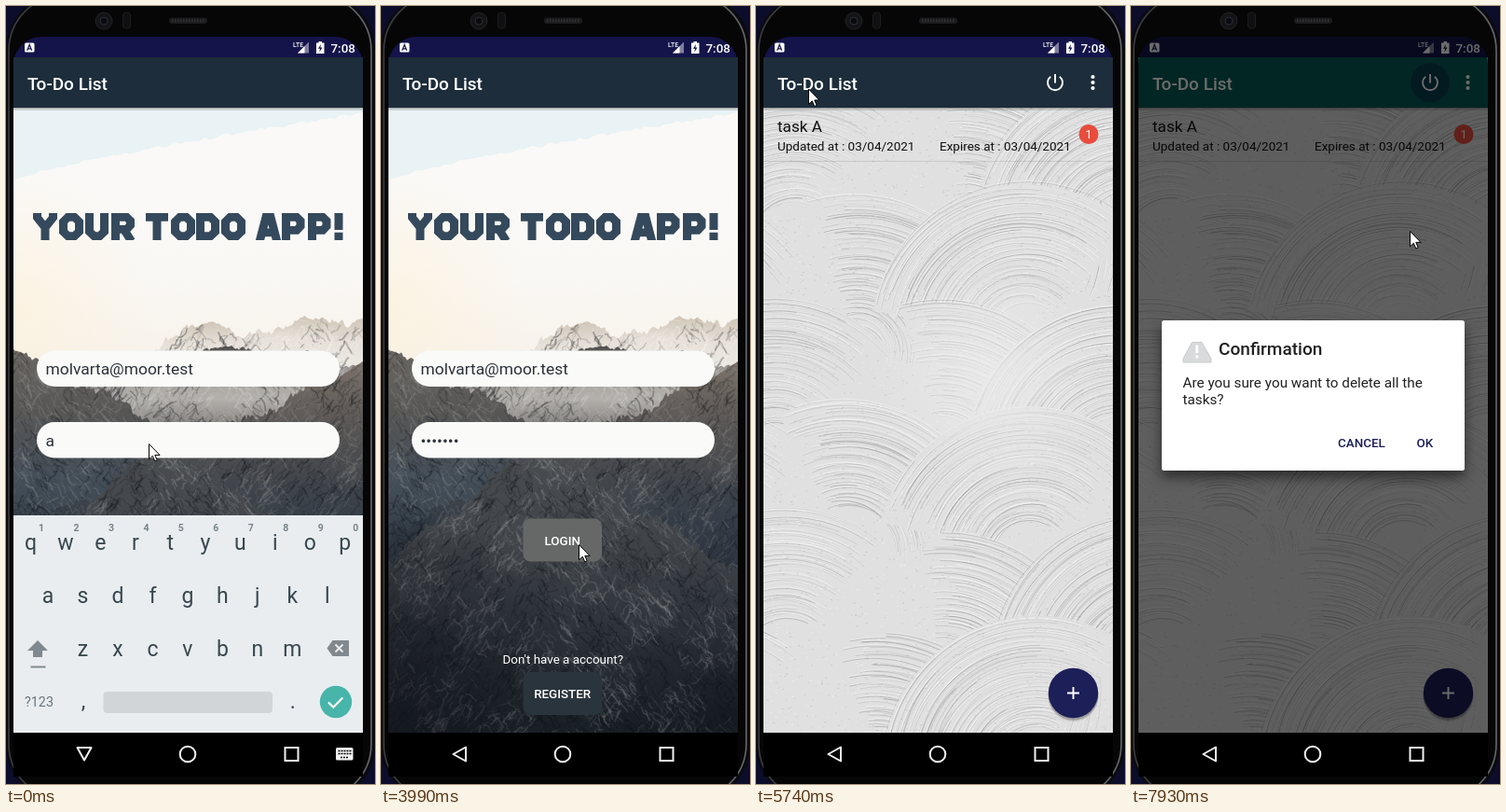
An HTML page with a canvas for the animation above (8000 ms loop, 396 px wide and 834 px high).

```html
<!DOCTYPE html>
<html lang="en">
<head>
<meta charset="utf-8">
<title>To-Do List</title>
<style>
html, body { margin: 0; width: 100%; height: 100%; overflow: hidden; background: #0b0d2a; }
#stage { position: relative; width: 396px; height: 834px; overflow: hidden; }
#stage svg, #stage div { position: absolute; left: 0; top: 0; width: 396px; height: 834px; }
canvas { position: absolute; left: 8px; top: 109px; }
text { font-family: Roboto, "Noto Sans", sans-serif; white-space: pre; }
.mid { text-anchor: middle; }
.bold { font-weight: 500; }
#keyboard { clip-path: inset(0 0 54px 0); }
</style>
</head>
<body>
<div id="stage">

<svg viewBox="0 0 396 834">
  <defs>
    <linearGradient id="rim"><stop stop-color="#3c3d41"/><stop offset=".5" stop-color="#1c1d20"/><stop offset="1" stop-color="#66686d"/></linearGradient>
  </defs>
  <rect width="396" height="834" fill="#0b0d2a"/>
  <rect x="0" y="-14" width="396" height="867" rx="61" fill="#0b0b0e"/>
  <rect x="3" y="-12" width="389" height="863" rx="60" fill="#060607" stroke="url(#rim)" stroke-width="1.6"/>
  <circle cx="105" cy="16" r="9" fill="#141416" stroke="#232326"/>
  <circle cx="105" cy="16" r="4" fill="#0a0b12" stroke="#2b2d36"/>
  <rect x="125.5" y="7" width="8" height="17" rx="3" fill="#101012" stroke="#1d1d20"/>
  <rect x="175" y="12.5" width="41" height="6.5" rx="3" fill="#1b1b1d"/>
  <path d="M178 15.7h35" stroke="#313134" stroke-width="3" stroke-dasharray="1.5 1.5"/>
  <path d="M8 63A30 30 0 0 1 38 33H353A30 30 0 0 1 383 63Z" fill="#14144a"/>
  <rect x="8" y="55" width="375" height="724" fill="#1d2d3b"/>
  <rect x="8" y="779" width="375" height="47"/>
</svg>

<div id="home">
  <canvas id="peaks" width="375" height="670"></canvas>
  <svg viewBox="0 0 396 834">
    <clipPath id="caps"><rect x="20" y="222" width="350" height="29"/></clipPath>
    <g clip-path="url(#caps)">
      <g id="heading" role="img" aria-label="YOUR TODO APP!" fill="none" stroke="#35495c" stroke-width="9"/></g>
    </g>
    <g fill="#fafaf9">
      <rect x="33" y="369.5" width="325" height="38.5" rx="19.2"/>
      <rect x="33" y="446" width="325" height="38.5" rx="19.2"/>
    </g>
    <g fill="#2c3038" font-size="17.4">
      <text x="42.5" y="395">molvarta@moor.test</text>
      <text id="secret" x="42.5" y="471.5">a</text>
    </g>
    <rect id="caret" y="453" width="2" height="23" fill="#1c2058"/>
    <rect id="login" x="152.5" y="549.5" width="84.5" height="46" rx="8"/>
    <rect x="152.5" y="714" width="84.5" height="46" rx="8" fill="#2a343c"/>
    <g class="mid" fill="#fff" font-size="13.4">
      <text class="bold" x="194.7" y="578">LOGIN</text>
      <text x="195.3" y="704.5">Don't have a account?</text>
      <text class="bold" x="194.7" y="742">REGISTER</text>
    </g>
  </svg>
</div>

<div id="list">
  <canvas id="plaster" width="375" height="670"></canvas>
  <svg viewBox="0 0 396 834">
    <g fill="#111">
      <text x="23" y="135" font-size="17.2">task A</text>
      <text x="23" y="154.5" font-size="13.5">Updated at : 03/04/2021</text>
      <text x="197" y="154.5" font-size="13.5">Expires at : 03/04/2021</text>
    </g>
    <path d="M8 166.5H383" stroke="#000" opacity=".1"/>
    <circle cx="357" cy="137.5" r="10.5" fill="#e84c3d"/>
    <text class="mid" x="357" y="142.3" font-size="13.4" fill="#fff">1</text>
    <circle cx="340.5" cy="740" r="27" opacity=".12"/>
    <circle cx="340.5" cy="738.5" r="27" opacity=".2"/>
    <circle cx="340.5" cy="736.5" r="26.7" fill="#1c1f58"/>
    <path d="M334 736.5h13M340.5 730v13" stroke="#fff" stroke-width="1.9"/>
  </svg>
</div>

<svg viewBox="0 0 396 834">
  <rect id="bar" x="8" y="55" width="375" height="54"/>
  <path d="M8 109.5H383" stroke="#000" opacity=".3"/>
  <path d="M8 111H383" stroke="#000" stroke-width="2" opacity=".12"/>
  <text class="bold" x="23" y="89.8" font-size="19" fill="#fff">To-Do List</text>
  <g id="tools">
    <circle id="tap" cx="321" cy="82" r="21" fill="#0a2a4a" opacity=".55"/>
    <path d="M316.2 75.8a8 8 0 1 0 9.6 0M321 73v9.5" fill="none" stroke="#fff" stroke-width="1.9"/>
    <path d="M361.5 76v13" stroke="#fff" stroke-width="4.2" stroke-linecap="round" stroke-dasharray="0 6"/>
  </g>
  <rect x="20" y="39.5" width="10.5" height="10" rx="1.5" fill="#fff"/>
  <path d="M22.7 47.8L25.2 41.5L27.7 47.8M23.5 45.8h3.5" fill="none" stroke="#14144a" stroke-width="1.2"/>
  <text class="bold" x="308" y="43.5" font-size="6.8" fill="#fff">LTE</text>
  <path d="M325 38.5V50.5H313Z" fill="#7f80a0"/>
  <path d="M320.5 43V50.5H313Z" fill="#fff"/>
  <path d="M333 39.5h2.5v-1.5h3.5v1.5h2.5v11.5h-8.5z" fill="#fff"/>
  <path d="M338 40.8l-3 4.9h2l-.7 3.8l3.2-5h-2.2z" fill="#14144a"/>
  <clipPath id="corner"><path d="M8 83V63A30 30 0 0 1 38 33H353A30 30 0 0 1 383 63V83Z"/></clipPath>
  <text class="bold" clip-path="url(#corner)" x="348.5" y="49.5" font-size="13.4" fill="#fff">7:08</text>
</svg>

<svg id="keyboard" viewBox="0 0 396 834">
  <g id="keys">
    <rect x="8" y="546" width="375" height="233" fill="#e9edf0"/>
    <g id="letters" class="mid" fill="#37474f"></g>
    <path d="M34 680l11 11h-6v7h-10v-7h-6z" fill="#80898f"/>
    <path d="M26.5 708.5h16" stroke="#80898f" stroke-width="2"/>
    <path d="M344.5 688.5l6-8.5h17.5v17h-17.5z" fill="#80898f"/>
    <path d="M353.5 684.5l8 8m0-8l-8 8" stroke="#e9edf0" stroke-width="1.9"/>
    <rect x="104.5" y="735" width="181.5" height="23" rx="4" fill="#d2d5d7"/>
    <circle cx="354" cy="746" r="17.2" fill="#48b5aa"/>
    <path d="M346 746.5l5.3 5.3l10-10.3" fill="none" stroke="#fff" stroke-width="2.2"/>
  </g>
</svg>

<svg viewBox="0 0 396 834">
  <rect id="press" x="39" y="780" width="90" height="45" rx="22.5" fill="#303233"/>
  <g fill="none" stroke="#f2f2f2" stroke-width="2">
    <path id="back" d="M77.5 802L91 794.5V809.5Z" stroke-linejoin="round"/>
    <circle cx="195" cy="802" r="8.3"/>
    <rect x="299.5" y="795" width="14" height="14"/>
  </g>
  <g id="switcher">
    <rect x="354" y="795" width="18.5" height="13.5" rx="1.5" fill="#f2f2f2"/>
    <path d="M356.5 798.5h14M356.5 801.5h14M359 805.5h9" stroke="#000" stroke-width="1.4" stroke-dasharray="2 1"/>
  </g>
</svg>

<svg id="dialog" viewBox="0 0 396 834">
  <path d="M8 779V63A30 30 0 0 1 38 33H353A30 30 0 0 1 383 63V779Z" opacity=".58"/>
  <rect x="33" y="337" width="325" height="161" rx="2.5" fill="#fff" style="filter: drop-shadow(0 7px 7px #0008)"/>
  <path d="M65.5 360.5h10.5l10 17.5v4h-30v-4z" fill="#d9dadb" stroke="#c9cacb" stroke-linejoin="round"/>
  <path d="M70.8 363.5v8.5M70.8 374.5v3" stroke="#fff" stroke-width="2.8"/>
  <g fill="#212121">
    <text class="bold" x="94" y="374.3" font-size="19.1">Confirmation</text>
    <text x="55.5" y="409" font-size="15.3">Are you sure you want to delete all the</text>
    <text x="55.5" y="427" font-size="15.3">tasks?</text>
  </g>
  <g class="bold" fill="#1c2058" font-size="13.4">
    <text x="222" y="473">CANCEL</text>
    <text x="306.5" y="473">OK</text>
  </g>
</svg>

<svg viewBox="0 0 396 834">
  <path id="pointer" d="M0 0V16.3L3.8 12.8L6.3 18.5L8.7 17.5L6.3 11.9H11.5Z" fill="#fff" stroke="#000"/>
</svg>
</div>

<script>
const $ = id => document.getElementById(id);
const LOOP = 8000, TICK = 137;

function svgAdd(parent, tag, attrs, label) {
  const el = document.createElementNS("http://www.w3.org/2000/svg", tag);
  for (const k in attrs) el.setAttribute(k, attrs[k]);
  if (label) el.textContent = label;
  parent.append(el);
}

function seeded(s) {
  return () => {
    s = (s + 0x6D2B79F5) | 0;
    let x = Math.imul(s ^ (s >>> 15), 1 | s);
    x = (x + Math.imul(x ^ (x >>> 7), 61 | x)) ^ x;
    return ((x ^ (x >>> 14)) >>> 0) / 4294967296;
  };
}

// Block lettering for the heading, drawn on a 30px cap height.
const glyphs = {
  Y: "M4.5-2v7L13 16L21.5 5V-2M13 14v16",
  O: "M9.5 4.5h7l5 5v11l-5 5h-7l-5-5v-11z",
  U: "M4.5 0v20.5l5 5h6l5-5V0",
  R: "M4.5 30V4.5h12l4 4v5l-4 4.5H4.5M13.5 18l8 13",
  T: "M0 4.5h24M12 4v26",
  D: "M4.5 4.5h11l5 5v11l-5 5h-11z",
  A: "M4 32L11 4.5h5L23 32M7 21.5h13",
  P: "M4.5 30V4.5h11.5l4 4v6l-4 4.5H4.5",
  "!": "M5 0v18.5M5 21.5v8.5"
};
function word(letters, x, step) {
  [...letters].forEach((c, i) => svgAdd($("heading"), "path",
    { d: glyphs[c], transform: `translate(${x + i * step} 222) scale(1 .967)` }));
}
word("YOUR", 29, 28);
word("TODO", 150, 27);
word("APP!", 268, 28);

function keyRow(chars, x, y, style = { "font-size": 23 }) {
  [...chars].forEach((c, i) => svgAdd($("letters"), "text", { x: x + i * 37.47, y, ...style }, c));
}
keyRow("1234567890", 38, 562.5, { "font-size": 10.5, "font-weight": 700, fill: "#78848b" });
keyRow("qwertyuiop", 26.5, 583);
keyRow("asdfghjkl", 45, 640);
keyRow("zxcvbnm", 82.5, 697);
keyRow(",     .", 83, 753);
svgAdd($("letters"), "text", { x: 35.5, y: 751, "font-size": 14.3, fill: "#68757d" }, "?123");

function paintPeaks() {
  const c = $("peaks").getContext("2d"), rnd = seeded(11);
  const fade = (y0, y1, stops) => {
    const g = c.createLinearGradient(0, y0, 0, y1);
    stops.forEach((s, i) => g.addColorStop(i / (stops.length - 1), s));
    return g;
  };
  function glow(x, y, r, rgb, alpha) {
    const g = c.createRadialGradient(x, y, 0, x, y, r);
    g.addColorStop(0, `rgba(${rgb},${alpha})`);
    g.addColorStop(1, `rgba(${rgb},0)`);
    c.fillStyle = g;
    c.fillRect(8, 109, 375, 670);
  }
  // One summit with straight flanks, roughened by octaves, and scree running downhill.
  function mountain(x, y, left, right, depth, stops, bright) {
    const phase = rnd() * 9;
    const top = px => {
      const d = Math.abs(px - x);
      let v = y + d * (px < x ? left : right);
      for (let k = 1; k < 6; k++) v += Math.min(1, d / 30) * 5 / k * Math.sin(px * .07 * k * k + phase * k);
      return v;
    };
    c.save();
    c.beginPath();
    c.moveTo(8, 780);
    for (let px = 8; px <= 384; px += 2) c.lineTo(px, top(px) + rnd() * 1.5);
    c.lineTo(384, 780);
    c.fillStyle = fade(y, y + depth, stops);
    c.fill();
    c.clip();
    for (let i = 0; i < depth * 12; i++) {
      let px = 8 + rnd() * 375, py = top(px) + rnd() * depth;
      const face = Math.sin(px * .075 + py * .035 + phase) + Math.sin(px * .03 - py * .06) + rnd() * 2 - 1;
      const lean = (px < x ? -1 : 1) * (rnd() < .75 ? 1 : -1);
      c.strokeStyle = face > 0 ? `rgba(${bright},${.06 + rnd() * .2})` : `rgba(10,14,20,${.08 + rnd() * .22})`;
      c.lineWidth = .5 + rnd() * 1.6;
      c.beginPath();
      c.moveTo(px, py);
      for (let k = 0; k < 4; k++) c.lineTo(px += lean * rnd() * 4, py += rnd() * 5);
      c.stroke();
    }
    c.restore();
  }
  c.translate(-8, -109);
  c.fillStyle = fade(109, 380, ["#faf9f8", "#faf9f7", "#faf8f5", "#f7f2ea"]);
  c.fillRect(8, 109, 375, 670);
  c.beginPath();
  c.moveTo(8, 109);
  for (let x = 8; x <= 383; x += 5) c.lineTo(x, 185 - 72 * ((x - 8) / 375) ** .8 + rnd() * 4);
  c.lineTo(383, 109);
  c.fillStyle = "#e9f2f4";
  c.fill();
  glow(8, 320, 150, "253,240,214", .6);

  const haze = ["#cfc4b6", "#e6e0d8", "#ebe7e1"];
  mountain(222, 337, .42, .4, 50, haze, "250,246,240");
  mountain(320, 332, .42, .3, 50, haze, "250,246,240");
  mountain(383, 334, .5, 0, 50, haze, "250,246,240");
  mountain(228, 365, .22, .12, 85, ["#4f4e4e", "#a5a29e", "#b3b0ac", "#85827f"], "225,222,218");
  mountain(8, 368, 0, .5, 200, ["#6b6763", "#575655", "#46505a", "#35404a"], "165,165,163");
  mountain(383, 380, .5, 0, 260, ["#7d736a", "#504f50", "#343d47", "#252e37"], "150,148,145");
  mountain(165, 470, .8, .62, 300, ["#4b4d50", "#41454a", "#2d3339", "#1b2128"], "170,171,172");
  glow(20, 740, 200, "16,20,26", .65);
  glow(370, 780, 150, "16,20,26", .5);
}

function paintPlaster() {
  const c = $("plaster").getContext("2d"), rnd = seeded(5);
  c.translate(-8, -109);
  c.fillStyle = "#e0e0e0";
  c.fillRect(8, 109, 375, 670);
  // Trowel sweeps, laid like overlapping scales with alternating tilt.
  function sweep(x, y, tilt) {
    const mid = tilt - Math.PI / 2, inner = 25 + rnd() * 30, outer = 165;
    c.beginPath();
    c.arc(x, y, outer, mid - 1.1, mid + 1.1);
    c.arc(x, y, inner, mid + 1.1, mid - 1.1, true);
    c.fillStyle = "#e0e0e0";
    c.fill();
    for (let r = inner; r < outer; r += 1.4 + rnd() * 1.8) {
      const from = mid - 1.1 + rnd() * .3, to = mid + 1.1 - rnd() * .4, cut = from + (to - from) * rnd();
      const dx = rnd() * 8 - 4, dy = rnd() * 8 - 4;
      const arc = (radius, a, b, shade, alpha) => {
        c.strokeStyle = `rgba(${shade},${shade},${shade},${alpha})`;
        c.lineWidth = .5 + rnd() * .8;
        c.beginPath();
        c.arc(x + dx, y + dy, radius, a, b);
        c.stroke();
      };
      arc(r, from, cut, 125, .1 + rnd() * .32);
      arc(r + .6, cut, to, 130, .05 + rnd() * .25);
      arc(r + 1.3, from, to, 248, .2 + rnd() * .4);
    }
  }
  for (let row = 0; row < 6; row++)
    for (let col = -1; col < 3; col++)
      sweep(col * 190 + (row % 2) * 95 + rnd() * 40, 240 + row * 115 + rnd() * 30, ((row + col) % 2 ? .65 : -.5) + rnd() * .4);
  for (let i = 0; i < 3500; i++) {
    c.fillStyle = rnd() < .5 ? "rgba(120,120,120,.2)" : "rgba(255,255,255,.35)";
    c.fillRect(8 + rnd() * 375, 109 + rnd() * 670, 1 + rnd() * 1.5, 1);
  }
  const shine = c.createRadialGradient(250, 395, 10, 250, 395, 120);
  shine.addColorStop(0, "rgba(236,236,236,.75)");
  shine.addColorStop(1, "rgba(236,236,236,0)");
  c.fillStyle = shine;
  c.fillRect(8, 109, 375, 670);
}

paintPeaks();
paintPlaster();

function progress(t, start, end) {
  const n = Math.round((end - start) / TICK);
  const p = Math.floor((t - start) / (end - start) * n + 1e-6) / n;
  return Math.min(1, Math.max(0, p));
}
const ease = p => p * p * (3 - 2 * p);

// Pointer glides: start, end, destination.
const glides = [
  [1970, 2930, 88, 804], [3050, 3620, 212, 577], [4420, 5170, 105, 181], [5170, 5580, 17, 112],
  [5580, 5850, 95, 65], [5850, 6250, 281, 114], [6250, 6520, 332, 82], [6700, 6980, 326, 81], [7660, 7930, 299, 241]
];
function pointerAt(t) {
  let x = 153, y = 469;
  for (const [start, end, toX, toY] of glides) {
    const p = ease(progress(t, start, end));
    x += (toX - x) * p;
    y += (toY - y) * p;
  }
  return `translate(${x + .5} ${y + .5})`;
}

// The newest character stays readable until it is masked.
const presses = [400, 710, 850, 1010, 1290, 1570];
function secretAt(t) {
  const n = presses.filter(p => p <= t).length;
  return "•".repeat(n) + (t >= 1970 ? "•" : n || "a");
}

function draw(t) {
  const typing = t < 3050, hide = progress(t, 3050, 3480);
  const shown = progress(t, 4120, 4420), asked = progress(t, 7660, 7930);
  const caretOn = (t >= 280 && t < 2380) || (t >= 3330 && t < 3990);
  $("pointer").setAttribute("transform", pointerAt(t));
  $("secret").textContent = secretAt(t);
  $("caret").setAttribute("x", 42.5 + $("secret").getComputedTextLength());
  $("caret").style.opacity = +caretOn;
  $("keys").setAttribute("transform", `translate(0 ${typing ? 0 : 1 + 233 * hide})`);
  $("keys").style.opacity = typing ? 1 : .97 * (1 - hide);
  $("back").setAttribute("transform", typing ? "rotate(-90 84 802)" : "");
  $("switcher").style.opacity = +typing;
  $("press").style.opacity = typing ? 0 : 1 - hide;
  $("login").setAttribute("fill", t < 3620 ? "#2a343c" : "#666767");
  $("list").style.opacity = $("tools").style.opacity = shown;
  $("list").style.transform = `translateY(${34 * (1 - shown)}px)`;
  $("tap").style.opacity = t < 7660 ? 0 : .55;
  $("dialog").style.opacity = asked;
  $("bar").setAttribute("fill", asked ? "#055a56" : "#1d2d3b");
}

function tick() {
  draw(performance.now() % LOOP);
  requestAnimationFrame(tick);
}
tick();
</script>
</body>
</html>
```
